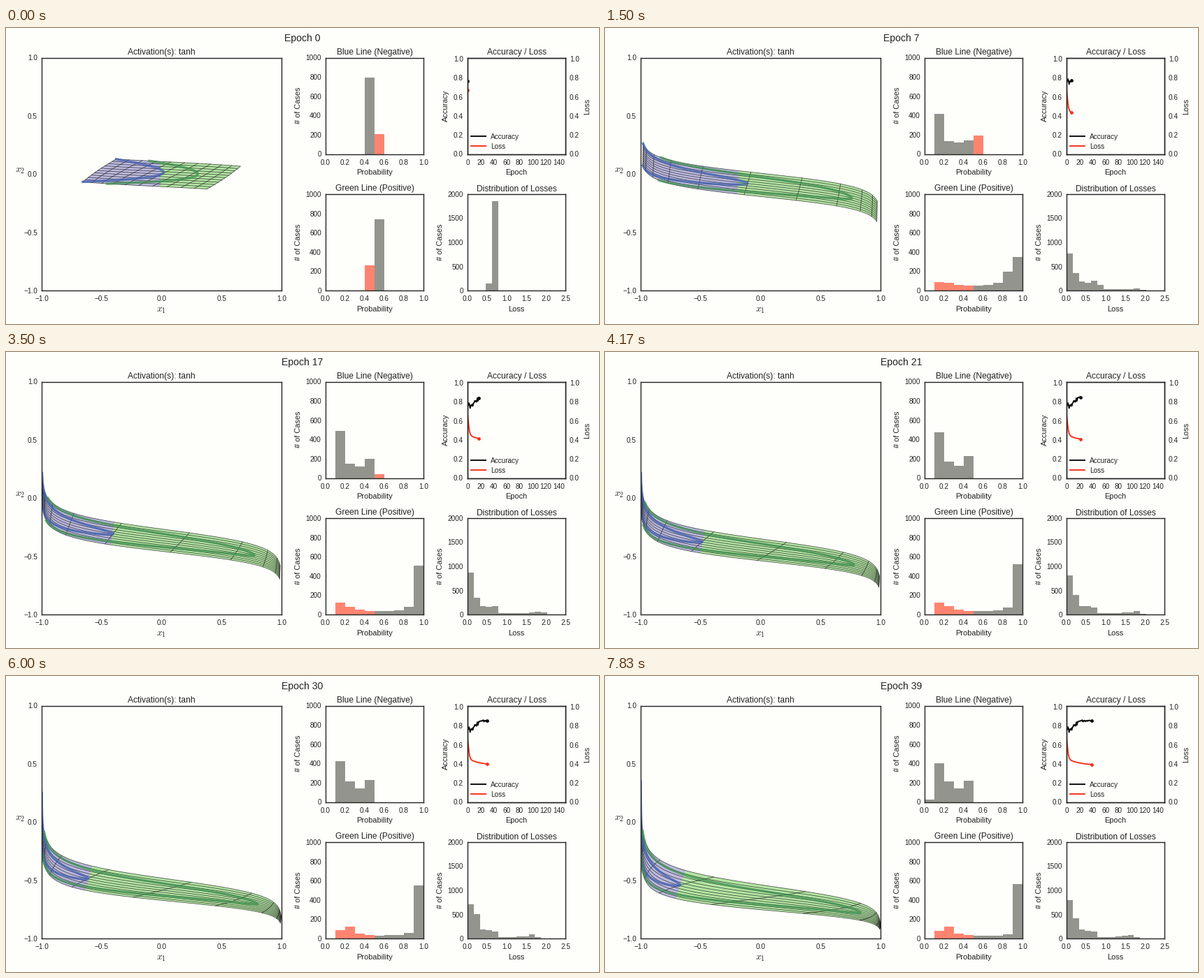
These frames come from a looping animation (848 by 424 pixels, 8000 ms). A matplotlib script:

```python
import numpy as np
import matplotlib.pyplot as plt
from matplotlib.animation import FuncAnimation
from matplotlib.patches import Polygon

W, H, DPI = 848, 424, 106
FRAMES, STEP = 80, 100
EPOCHS = np.arange(40)

PAPER, INK = "#fefefb", "#222220"
GREY, SALMON, RED = "#94948e", "#ff8470", "#f6301a"
LAVENDER, LIME = "#bebbe0", "#b4e6a4"
BLUE, GREEN = "#3f60b0", "#3d9050"


def px(v):
    return v * 72 / DPI


plt.rcParams.update({
    "font.family": "Liberation Sans", "mathtext.fontset": "cm",
    "text.color": INK, "axes.edgecolor": INK, "axes.facecolor": "none",
    "xtick.labelcolor": INK, "ytick.labelcolor": INK,
    "axes.linewidth": px(1.4),
})


# --- The network ---------------------------------------------------------

def weights(e):
    """Weights after e epochs: an early jump, then a slow bending drift."""
    jump = np.tanh(e / 4)

    def w(start, leap, slope, bend):
        return start + leap * jump + slope * e + bend * e ** 2

    # hidden unit i: tanh(a x + b y + c)
    unit1 = w(.194, -.19, 0, .00027), w(.592, 1.2, .073, -.0004), \
        w(0, .19, -.0445, .000473)
    unit2 = .098, w(-.031, -.11, -.0165, -.00006), w(0, .14, -.0329, .00035)
    # output: sigmoid(gain * (x1 - p - q x2))
    out = w(.36, 2.2, .04, -.0003), w(-.01, 0, -.0275, .00039), .0085 * e
    return unit1, unit2, out


def hidden(pts, e):
    x, y = pts
    return [np.tanh(a * x + b * y + c) for a, b, c in weights(e)[:2]]


def prob(pts, e):
    x1, x2 = hidden(pts, e)
    gain, p, q = weights(e)[2]
    return 1 / (1 + np.exp(-gain * (x1 - p - q * x2)))


t = np.linspace(-1, 1, 1000)
NEG, POS = (t, -t ** 2), (t, .5 - t ** 2)


def losses(e):
    return -np.log(np.concatenate([1 - prob(NEG, e), prob(POS, e)]))


noise = np.random.default_rng(4).normal(0, .02, len(EPOCHS))
noise *= np.exp(-EPOCHS / 18) * (EPOCHS > 1)
accuracy = [np.mean(losses(e) < np.log(2)) for e in EPOCHS] + noise
mean_loss = [losses(e).mean() for e in EPOCHS]


# --- Layout --------------------------------------------------------------

fig = plt.figure(figsize=(W / DPI, H / DPI), dpi=DPI, facecolor=PAPER)


def label(x, y, text, size=11, ha="center", va="center_baseline", rot=0):
    return fig.text(x / W, 1 - y / H, text, fontsize=px(size), ha=ha, va=va,
                    rotation=rot)


def panel(x0, y0, x1, y1, xlim, ylim, xticks, yticks, fmt, title):
    ax = fig.add_axes([x0 / W, 1 - y1 / H, (x1 - x0) / W, (y1 - y0) / H])
    ax.set(xlim=xlim, ylim=ylim, xticks=xticks, yticks=yticks)
    for axis, f in zip((ax.xaxis, ax.yaxis), fmt):
        axis.set_major_formatter(
            lambda v, _, f=f: f.format(v + 0.0).replace("-", "\u2212"))
    ax.tick_params(length=0, labelsize=px(10))
    ax.tick_params(axis="x", pad=px(7))
    ax.tick_params(axis="y", pad=px(6))
    for spine in ax.spines.values():
        spine.set_zorder(6)
    label((x0 + x1) / 2, y0 - 9, title, 12)
    return ax


heading = label(424, 14, "", 14)

half = np.arange(-2, 3) / 2
fifth = np.arange(6) / 5
space = panel(51, 42.5, 394, 376, (-1, 1), (-1, 1), half, half,
              ("{:.1f}", "{:.1f}"), "Activation(s): tanh")
neg_ax = panel(457, 42.5, 597, 180.5, (0, 1), (0, 1000), fifth, fifth * 1000,
               ("{:.1f}", "{:.0f}"), "Blue Line (Negative)")
pos_ax = panel(457, 238, 597, 376, (0, 1), (0, 1000), fifth, fifth * 1000,
               ("{:.1f}", "{:.0f}"), "Green Line (Positive)")
score = panel(660, 42.5, 800, 180.5, (0, 150), (0, 1.01),
              np.arange(0, 141, 20), fifth, ("{:.0f}", "{:.1f}"),
              "Accuracy / Loss")
loss_ax = panel(660, 238, 800, 376, (0, 2.5), (0, 2000),
                np.arange(6) / 2, np.arange(0, 2001, 500),
                ("{:.1f}", "{:.0f}"), "Distribution of Losses")

right = score.twinx()
right.set(ylim=(0, 1.01), yticks=fifth)
right.tick_params(length=0, labelsize=px(10), pad=px(6))

label(222.5, 404, "$x_1$", 14, va="center")
label(20, 204, "$x_2$", 14, va="center")
for x, y, text in ((527, 205.5, "Probability"), (527, 401.5, "Probability"),
                   (730, 205.5, "Epoch"), (730, 401.5, "Loss")):
    label(x, y, text)
for x, y, text in ((418, 111, "# of Cases"), (418, 307, "# of Cases"),
                   (621, 307, "# of Cases"), (629, 111, "Accuracy"),
                   (831, 112, "Loss")):
    label(x, y, text, va="center", rot=90)

# Feature space: shaded sheet, warped grid and the two curves
s = np.linspace(-1, 1, 81)
one = np.ones_like(s)
rim = (np.concatenate([s, one, -s, -one]), np.concatenate([-one, s, one, -s]))
sheet = Polygon(np.zeros((4, 2)), fc=LIME, lw=0, zorder=1)
shade = Polygon(np.zeros((4, 2)), fc=LAVENDER, lw=0, zorder=1.5)
space.add_patch(sheet)
space.add_patch(shade)

lines = []
for v in np.linspace(-1, 1, 11):
    for pts in ((s, v * one), (v * one, s)):
        line, = space.plot([], [], color="#181818", lw=px(.8), alpha=.75,
                           zorder=2)
        lines.append((line, pts))
for pts, color in ((NEG, BLUE), (POS, GREEN)):
    line, = space.plot([], [], color=color, lw=px(3.6), alpha=.72, zorder=3)
    lines.append((line, pts))


def bars(ax, edges, color):
    return ax.bar(edges[:-1], 0 * edges[:-1], np.diff(edges), align="edge",
                  color=color, lw=0), edges


tenths = np.linspace(0, 1, 11)
charts = [
    (bars(neg_ax, tenths, [GREY] * 5 + [SALMON] * 5), lambda e: prob(NEG, e)),
    (bars(pos_ax, tenths, [SALMON] * 5 + [GREY] * 5), lambda e: prob(POS, e)),
    (bars(loss_ax, np.linspace(0, 2.5, 17), GREY), losses),
]

# Scores with their legend
traces = []
for data, color, name, y in ((accuracy, "#080808", "Accuracy", 155),
                             (mean_loss, RED, "Loss", 169)):
    line, = score.plot([], [], color=color, lw=px(1.9))
    dot, = score.plot([], [], "o", color=color, ms=px(4.8), mew=0)
    level = (180.5 - y) / 138 * 1.01
    score.plot([5.4, 27.9], [level, level], color=color, lw=px(1.9))
    label(693, y, name, 10, ha="left")
    traces.append((line, dot, data))


def draw(frame):
    # epochs last 200 ms but are shown on a clock of six ticks a second
    tick = int((frame * STEP + 70) * 6 / 1000)
    e = int(np.ceil((5 * tick - 3) / 6))
    heading.set_text(f"Epoch {e}")

    _, p, q = weights(e)[2]
    sheet.set_xy(np.column_stack(hidden(rim, e)))
    shade.set_xy([(-1, -1), (p - q, -1), (p + q, 1), (-1, 1)])
    shade.set_clip_path(sheet)
    for line, pts in lines:
        line.set_data(*hidden(pts, e))

    for (rects, edges), sample in charts:
        for rect, n in zip(rects, np.histogram(sample(e), edges)[0]):
            rect.set_height(n)
    for line, dot, data in traces:
        line.set_data(EPOCHS[:e + 1], data[:e + 1])
        dot.set_data([e], [data[e]])
    return []


anim = FuncAnimation(fig, draw, frames=FRAMES, interval=STEP,
                     repeat=True, repeat_delay=0, blit=False)
plt.show()
```
